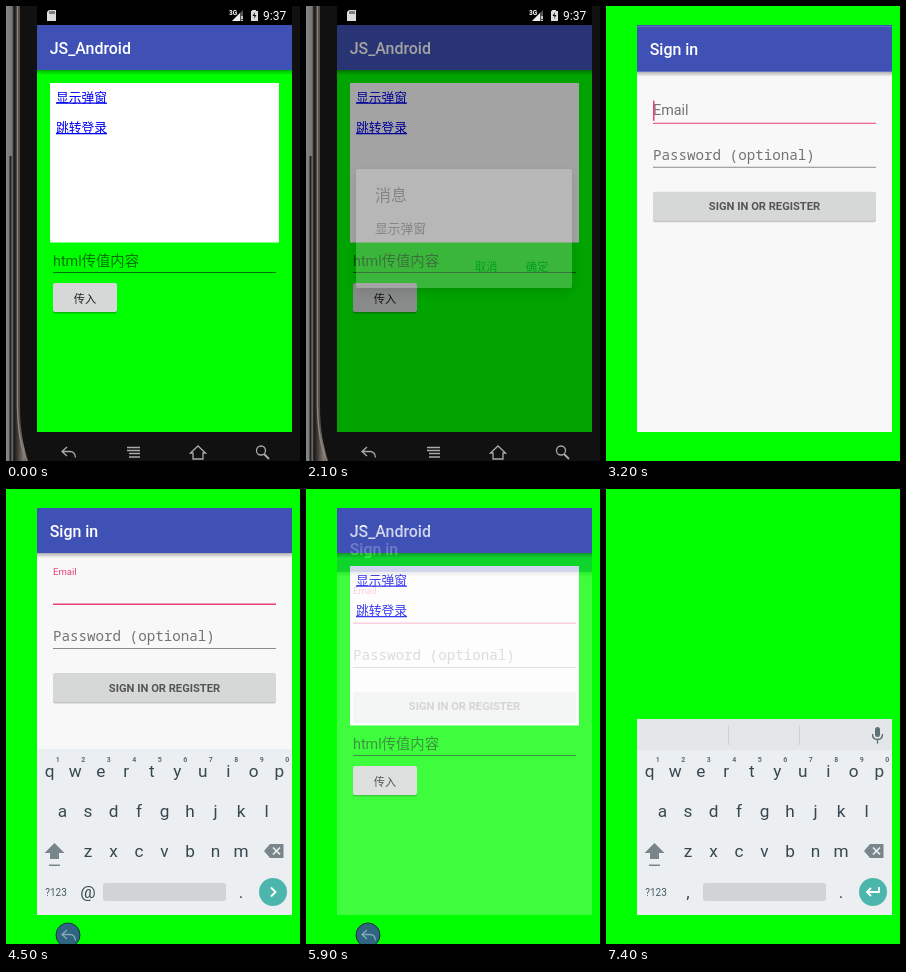
Write an HTML page that moves like this. It is 294 px wide and 455 px high and loops after 8 s.

```html
<!DOCTYPE html>
<html lang="en">
<head>
<meta charset="utf-8">
<style>
  html, body { margin: 0; width: 100%; height: 100%; overflow: hidden; background: #0f0; }
  svg { display: block; width: 294px; height: 455px; font-family: Roboto, "Noto Sans CJK SC", sans-serif; }
  text { white-space: pre; }
  .title { font-size: 15.94px; font-weight: 500; fill: #fff; }
  .field { font-size: 14.35px; }
  .link { font-size: 12.75px; fill: #00e; text-decoration: underline; }
  .small { font-size: 11.16px; }
  .mid { text-anchor: middle; }
  .key { font-size: 17.2px; fill: #37474f; text-anchor: middle; }
  .digit { font-size: 7px; font-weight: 700; fill: #546e7a; text-anchor: middle; }
  .icon { fill: none; stroke: #aaa; stroke-width: 1.3; }
</style>
</head>
<body>
<svg viewBox="0 0 294 455">
  <defs>
    <linearGradient id="metal">
      <stop offset="0" stop-color="#858585"/><stop offset=".27" stop-color="#777"/>
      <stop offset=".34" stop-color="#191716"/><stop offset=".55" stop-color="#4a433f"/>
      <stop offset=".78" stop-color="#857c75"/><stop offset=".92" stop-color="#3a3532"/>
      <stop offset="1" stop-color="#111"/>
    </linearGradient>
    <linearGradient id="shade" x2="0" y2="1">
      <stop offset="0" stop-opacity=".3"/><stop offset="1" stop-opacity="0"/>
    </linearGradient>
    <filter id="lift" x="-10%" y="-15%" width="120%" height="140%">
      <feDropShadow dx="0" dy="4" stdDeviation="5" flood-opacity=".45"/>
    </filter>
    <clipPath id="screen"><path d="M31 19h255v407H31z"/></clipPath>
    <g id="bar">
      <rect x="31" y="64" width="255" height="5" fill="url(#shade)"/>
      <rect x="31" y="19" width="255" height="45" fill="#3f51b5"/>
    </g>
    <path id="arrow" d="M61 441l-5 4.500 5 4.500M56 445.500h8q5 0 5.500 6" />
  </defs>

  <rect width="294" height="455" fill="#0f0"/>

  <g id="device">
    <rect width="294" height="455" fill="#111"/>
    <path d="M0 0H14V400Q14 435 23 455H0z" fill="url(#metal)"/>
    <path d="M11.500 0V400Q12 436 21 455" fill="none" stroke="#8d857e" stroke-width="1.500"/>
    <path d="M4.500 150V455" stroke="#222" stroke-width="2"/>
    <rect x="31" width="255" height="19"/>
    <path d="M43 4h7v11h-9V6z" fill="#ddd"/>
    <path d="M44 5v3m2-3v3m2-3v3" stroke="#222"/>
    <path d="M226 15h11V4z" fill="#555"/>
    <path d="M226 15h8V7z" fill="#eee"/>
    <path d="M236 10v3m0 1v1" stroke="#fff" stroke-width="1.300"/>
    <text x="223" y="9" fill="#fff" font-size="6.500" font-weight="700">3G</text>
    <path d="M246 4h4v1h2v10h-7V5h1z" fill="#ddd"/>
    <path d="M249 6l-2.500 4h2l-.5 3 2.500-4h-2z" fill="#111"/>
    <text x="257" y="14" fill="#fff" font-size="12">9:37</text>
    <g class="icon">
      <use href="#arrow"/>
      <path d="M121 441.500h13M121 444.500h13M123 447.500h11M123 451h11"/>
      <path d="M184.500 447l7.500-7 7.500 7h-2.500v6h-10v-6z"/>
      <circle cx="255" cy="444.500" r="4.500"/><path d="M258 448l5 5" stroke-width="2"/>
    </g>
  </g>

  <g id="main">
    <rect x="31" y="19" width="255" height="407" fill="#0f0"/>
    <use href="#bar"/>
    <text class="title" x="43.700" y="47.500">JS_Android</text>
    <rect x="44" y="77" width="229" height="159.500" fill="#fff"/>
    <text id="popupLink" class="link" x="50" y="95.500">显示弹窗</text>
    <text id="loginLink" class="link" x="50" y="126">跳转登录</text>
    <text class="field" x="47" y="260" fill-opacity=".55">html传值内容</text>
    <rect x="47" y="266" width="223" height="1" fill-opacity=".55"/>
    <rect id="inputLine" y="265.500" height="1.500" fill="#ff4081"/>
    <rect id="inputCursor" x="47" y="245" width="1.500" height="19" fill="#ff4081"/>
    <rect x="47" y="278" width="64" height="29.500" rx="2" fill-opacity=".25"/>
    <rect x="47" y="277" width="64" height="29" rx="2" fill="#d6d7d7"/>
    <text class="small mid" x="79" y="296.500" fill="#212121">传入</text>
  </g>
  <rect id="dim" x="31" y="19" width="255" height="407"/>

  <g id="dialog">
    <rect x="50" y="163" width="216" height="119" rx="2" fill="#fafafa" filter="url(#lift)"/>
    <text x="69" y="195" font-size="15.940" fill="#212121">消息</text>
    <text x="69" y="227" font-size="12.750" fill="#212121">显示弹窗</text>
    <g class="small" fill="#009688">
      <text x="169" y="264.500">取消</text>
      <text x="220" y="264.500">确定</text>
    </g>
  </g>

  <g clip-path="url(#screen)">
    <g id="signIn">
      <rect x="31" y="19" width="255" height="407" fill="#f8f8f8"/>
      <use href="#bar"/>
      <text class="title" x="43.700" y="47.500">Sign in</text>
      <text id="emailLabel" x="47">Email</text>
      <rect id="emailLine" x="47" width="223" fill="#e84079"/>
      <rect id="emailCursor" x="47" y="93" width="1.500" height="20" fill="#e84079"/>
      <text x="47" y="152" font-size="14.200" fill="#737373" style="font-family:'Noto Sans Mono',monospace">Password (optional)</text>
      <rect x="47" y="159" width="223" height="1" fill="#8a8a8a"/>
      <rect x="47" y="185" width="223" height="29.500" rx="2" fill-opacity=".2"/>
      <rect x="47" y="184" width="223" height="29" rx="2" fill="#d6d7d7"/>
      <text class="small mid" x="158.500" y="202.500" font-weight="700" fill="#555">SIGN IN OR REGISTER</text>
    </g>

    <g id="keyboard">
      <rect x="31" y="260" width="255" height="166" fill="#eceff1"/>
      <g id="strip">
        <rect x="31" y="230" width="255" height="31" fill="#e4e7e9"/>
        <path d="M122.500 236v20M193.500 236v20" stroke="#cdd2d5"/>
        <rect x="269" y="238" width="5" height="10" rx="2.500" fill="#607078"/>
        <path d="M266.500 245q0 5.500 5 5.500t5-5.500M271.500 250.500v4" fill="none" stroke="#607078" stroke-width="1.400"/>
      </g>
      <g id="keys"></g>
      <path d="M48.500 354l10 10h-5.500v6h-9v-6h-5.500z" fill="#78868c"/>
      <rect x="43" y="375.500" width="11" height="1.500" fill="#78868c"/>
      <path d="M258 362l6-7h13.500v14H264z" fill="#78868c"/>
      <path d="M267 358.500l7 7m0-7l-7 7" stroke="#eceff1" stroke-width="1.700"/>
      <text x="50" y="407" class="mid" font-size="10" fill="#455a64">?123</text>
      <text id="symbol" class="key" x="82" y="409"></text>
      <rect x="97" y="394" width="123" height="18" rx="2" fill="#d0d4d6"/>
      <text class="key" x="235" y="409">.</text>
      <circle cx="267" cy="403" r="14" fill="#4db6ac"/>
      <path id="action" fill="none" stroke="#fff" stroke-width="1.800"/>
    </g>
  </g>

  <g id="back">
    <circle id="halo" cx="62" cy="446" r="12" stroke="#1c3440"/>
    <use id="backArrow" href="#arrow" fill="none" stroke-width="1.300"/>
  </g>
</svg>

<script>
const LOOP = 8000, STEP = 100, SLIDE = 33;
const ui = {};
document.querySelectorAll('[id]').forEach(el => ui[el.id] = el);

const ramp = (t, from, to) => Math.min(1, Math.max(0, (t - from) / (to - from)));
const within = (t, from, to) => t >= from && t < to;
const set = (el, attrs) => { for (const k in attrs) el.setAttribute(k, attrs[k]); };
const show = (el, on) => set(el, { display: on ? 'inline' : 'none' });

function addKey(char, x, y, cls = 'key') {
  const text = document.createElementNS('http://www.w3.org/2000/svg', 'text');
  set(text, { x, y, class: cls });
  text.textContent = char;
  ui.keys.append(text);
}
[['qwertyuiop', 43.75, 288], ['asdfghjkl', 56.5, 328], ['zxcvbnm', 82, 368]].forEach(([row, x, y]) =>
  [...row].forEach((char, i) => addKey(char, x + 25.5 * i, y)));
[...'1234567890'].forEach((char, i) => addKey(char, 51.8 + 25.5 * i, 272.5, 'digit'));

function drawMain(t) {
  show(ui.device, t < 2300);
  show(ui.main, t < 7400);
  set(ui.popupLink, { style: t === 500 ? 'fill:red' : '' });
  set(ui.loginLink, { style: within(t, 2900, 3300) ? 'fill:red' : '' });

  const focus = ramp(t, 6600, 6800), width = 223 * focus;
  set(ui.inputLine, { x: 158.5 - width / 2, width });
  show(ui.inputCursor, within(t, 6800, 7300));
}

function drawDialog(t) {
  const enter = ramp(t, 500, 800);
  set(ui.dim, { opacity: 0.6 * enter * (1 - ramp(t, 2000, 2250)) });
  const alpha = enter * (1 - ramp(t, 2000, 2130)), scale = 0.9 + 0.1 * enter;
  show(ui.dialog, alpha > 0);
  set(ui.dialog, { opacity: alpha, transform: `translate(158 222.5) scale(${scale}) translate(-158 -222.5)` });
}

function drawSignIn(t) {
  const enter = 1 - (1 - ramp(t, 3000, 3260)) ** 2;
  const exit = ramp(t, 5700, 5964);
  show(ui.signIn, within(t, 3100, 6000));
  set(ui.signIn, {
    opacity: Math.min(1, enter * 1.1) * (1 - exit),
    transform: `translate(0 ${SLIDE * (1 - enter + exit ** 2)})`
  });

  const float = ramp(t, 3400, 3700);
  set(ui.emailLabel, {
    y: 107 - 21 * float,
    'font-size': 14.35 - 4.79 * float,
    fill: float > 0.5 ? '#e84079' : '#737373'
  });
  set(ui.emailLine, { y: 115 - 0.5 * float, height: 1 + 0.5 * float });
  show(ui.emailCursor, t < 4000 || within(t, 4600, 5000) || within(t, 5500, 5800));
}

function drawKeyboard(t) {
  const typing = t >= 7000;
  const alpha = typing ? ramp(t, 7200, 7370)
    : ramp(t, 3500, 3750) * (1 - ramp(t, 4500, 4700));
  show(ui.keyboard, alpha > 0);
  set(ui.keyboard, { opacity: alpha, transform: `translate(0 ${16 * (1 - alpha) ** 2})` });
  show(ui.strip, typing);
  ui.symbol.textContent = typing ? ',' : '@';
  set(ui.action, { d: typing ? 'M273 398v5H261m4-4l-4 4 4 4' : 'M265 398.500l4.500 4.500-4.500 4.500' });
}

function drawBack(t) {
  const hover = t < 6700;
  const pressed = t === 4400 || within(t, 5500, 5800);
  show(ui.back, within(t, 4300, 7400));
  set(ui.halo, { fill: !hover ? '#111' : pressed ? '#3b7fa3' : '#2f6580' });
  set(ui.backArrow, { stroke: hover ? '#86a9b8' : '#aaa' });
}

function frame(now) {
  const t = Math.floor(now % LOOP / STEP) * STEP;
  [drawMain, drawDialog, drawSignIn, drawKeyboard, drawBack].forEach(draw => draw(t));
  requestAnimationFrame(frame);
}
frame(performance.now());
</script>
</body>
</html>
```
